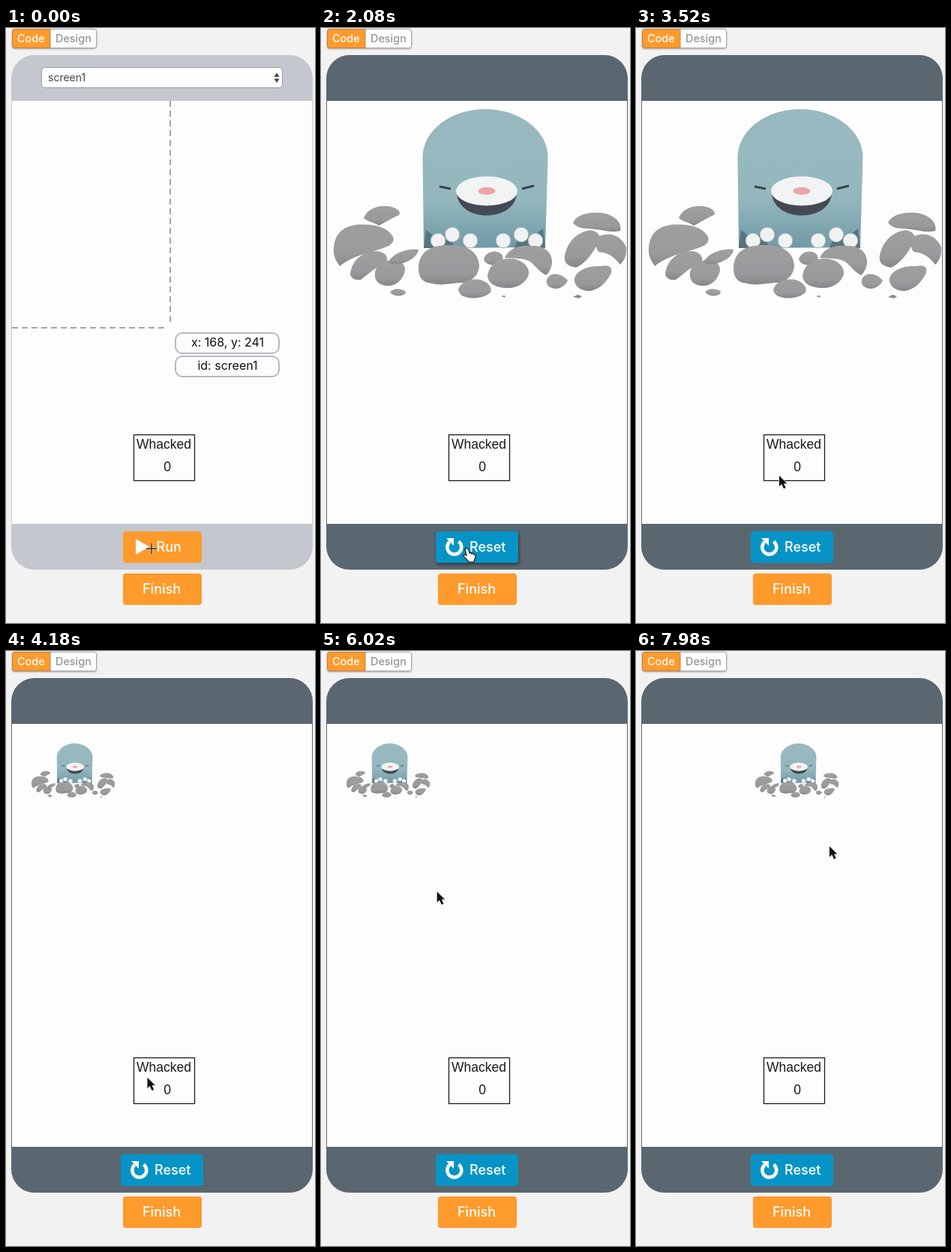
Animation of 412 by 792 pixels, one loop 8000 ms. Source, as an HTML page:

```html
<!DOCTYPE html>
<html lang="en">
<head>
<meta charset="utf-8">
<title>Whack a mole</title>
<style>
  html, body { margin: 0; width: 100%; height: 100%; overflow: hidden; background: #f2f2f2; }
  svg { display: block; width: 412px; height: 792px; }
  text { font-family: Inter, "Open Sans", sans-serif; }
  .button { font-size: 18px; font-weight: 500; fill: #fff; }
  .tab { font-size: 14.4px; font-weight: 500; }
  .label { font-size: 16px; fill: #111; text-anchor: middle; }
  .score { font: 17.5px "Liberation Sans", Arial, sans-serif; fill: #1a1a1c; }
  .shadow { filter: drop-shadow(1px 2px 2px #0008); }
  .tabs { filter: drop-shadow(0 1px 1px #0005); }
</style>
</head>
<body>
<svg viewBox="0 0 412 792">
  <defs>
    <linearGradient id="fur" x2="0" y2="1">
      <stop offset="0" stop-color="#98b9bf"/>
      <stop offset=".65" stop-color="#94b7be"/>
      <stop offset="1" stop-color="#7099a5"/>
    </linearGradient>
    <linearGradient id="stone" x2="0" y2="1">
      <stop offset="0" stop-color="#a09f9f"/>
      <stop offset=".7" stop-color="#9a999b"/>
      <stop offset="1" stop-color="#87868a"/>
    </linearGradient>
  </defs>

  <!-- tabs -->
  <g class="tabs">
    <rect x="8.500" y="1.500" width="112" height="25" rx="3" fill="#fefefe" stroke="#a9a9ab"/>
    <path d="M59 1.500H11.500a3 3 0 0 0-3 3v19a3 3 0 0 0 3 3H59z" fill="#ff9a2c" stroke="#b98048"/>
  </g>
  <text class="tab" x="15" y="19" fill="#fff">Code</text>
  <text class="tab" x="66" y="19" fill="#949598">Design</text>

  <!-- phone -->
  <rect id="phone" x="7" y="36" width="402" height="685" rx="31"/>
  <rect x="8" y="97" width="400" height="563" fill="#fdfdfd"/>
  <g id="select">
    <rect x="47.500" y="52.500" width="321" height="27" rx="4" fill="#fefefe" stroke="#9b9ca2"/>
    <text x="56" y="71" font-size="14" fill="#45464c">screen1</text>
    <path d="M357.500 65l3.500-5.500 3.500 5.500zM357.500 67.500l3.500 5.500 3.500-5.500z" fill="#404247"/>
  </g>

  <g id="mole">
    <path d="M137 293L135.500 172A83.500 64 0 0 1 302.500 172L299 292Z" fill="url(#fur)"/>
    <path d="M181 218c0 42 80 42 80 0z" fill="#454953"/>
    <ellipse cx="221" cy="217" rx="41" ry="19.500" fill="#f1f3f4"/>
    <ellipse cx="221" cy="217" rx="11.500" ry="5" fill="#eba4a8"/>
    <path d="M158 211l15 3M268 214l16-4" stroke="#3d434a" stroke-width="3"/>
    <path d="M137 293l3-24 14 10 16-6 8 20zM299 293l-3-26-14 11-16-6-8 21z" fill="#547480"/>
    <g id="toes" fill="#f0f2f3" stroke="#aab7bb"></g>
    <g fill="url(#stone)">
      <path d="M57 253C61 242 73 236 88 237C99 238 108 244 104 249C94 253 82 261 77 263C70 258 64 259 57 253Z"/>
      <path d="M17 293C18 276 27 265 46 262C66 260 87 264 94 275C101 283 93 290 85 292C68 299 43 302 25 317C20 309 16 304 17 293Z"/>
      <path d="M39 328C41 309 55 297 75 297C86 298 91 306 87 312C73 318 64 327 53 335C46 336 41 334 39 328Z"/>
      <path d="M72 326C73 315 85 308 99 309C111 311 115 320 110 329C105 340 94 346 82 342C75 340 71 334 72 326Z"/>
      <path d="M90 311C97 299 116 293 130 295C129 304 117 312 104 314C97 315 92 314 90 311Z"/>
      <path d="M92 352C96 346 106 346 113 351C113 357 99 359 92 352Z"/>
      <path d="M130 319C131 298 145 289 170 289C194 288 209 297 211 315C211 327 204 336 190 339C177 338 164 344 148 340C135 339 130 332 130 319Z"/>
      <path d="M183 348C187 337 199 333 212 335C222 338 229 344 226 352C217 360 202 361 193 358C187 357 184 353 183 348Z"/>
      <path d="M217 308C219 299 230 295 238 299C245 303 244 311 236 315C227 317 219 314 217 308Z"/>
      <path d="M245 306C250 293 264 289 281 290C299 289 309 300 308 313C307 321 303 327 300 329C292 325 287 318 279 311C268 305 255 307 245 306Z"/>
      <path d="M222 330C224 315 236 307 253 307C268 308 278 317 277 328C273 340 261 347 246 346C232 345 223 340 222 330Z"/>
      <path d="M301 335C305 325 319 325 329 336C325 345 315 349 308 346C302 344 300 340 301 335Z"/>
      <path d="M336 259C341 249 354 245 373 246C391 248 402 259 399 270C386 273 378 269 366 268C355 266 343 269 336 259Z"/>
      <path d="M325 303C329 284 341 272 359 269C372 271 374 279 369 287C362 300 354 312 340 319C329 317 323 312 325 303Z"/>
      <path d="M371 277C386 270 402 278 407 292C408 303 404 310 399 315C393 308 386 299 370 298C365 292 366 281 371 277Z"/>
      <path d="M338 333C342 321 358 316 374 317C385 314 390 320 386 328C379 340 372 347 359 350C345 350 337 343 338 333Z"/>
    </g>
    <path d="M336 358l6-3 6 2-4 3zM240 357l5-1 1 3z" fill="#8a898c"/>
  </g>

  <!-- score -->
  <rect x="170.500" y="541.500" width="81" height="61" fill="#fdfdfd" stroke="#1c1c1e" stroke-width="1.300"/>
  <text class="score" x="174" y="560">Whacked</text>
  <text class="score" x="215" y="590" text-anchor="middle">0</text>

  <!-- coordinate guides -->
  <g id="guides">
    <path d="M219 97V391M8 399H212" fill="none" stroke="#a2a4b0" stroke-width="2" stroke-dasharray="8 5"/>
    <g fill="#fdfdfd" stroke="#b6b8c3" stroke-width="2">
      <rect x="226" y="406" width="138" height="27" rx="9"/>
      <rect x="226" y="437" width="138" height="27" rx="9"/>
    </g>
    <text class="label" x="295.500" y="424">x: 168, y: 241</text>
    <text class="label" x="295.500" y="455">id: screen1</text>
  </g>

  <!-- buttons -->
  <g id="run">
    <rect x="156" y="670" width="105" height="42" rx="4" fill="#ff9a2c"/>
    <path d="M173 680v21l18-10.500z" fill="#fff"/>
    <text class="button" x="200.500" y="697">Run</text>
  </g>
  <g id="reset">
    <rect x="153" y="670" width="110" height="42" rx="4" fill="#0694c6"/>
    <path d="M183.500 683.500A9.500 9.500 0 1 1 171.500 684" fill="none" stroke="#fff" stroke-width="4.500"/>
    <path d="M167 679h10v10z" fill="#fff"/>
    <text class="button" x="198" y="697">Reset</text>
  </g>
  <rect x="156" y="726" width="105" height="42" rx="4" fill="#ff9a2c"/>
  <text class="button" x="182" y="753">Finish</text>

  <!-- pointers, each with its hot spot at 0,0 -->
  <g id="pointer">
    <circle id="ring" cx="1" cy="2" r="21.300" fill="none" stroke="#111" stroke-width="3"/>
    <g id="cross" fill="none">
      <path d="M-7 0H7M0-7V7" stroke="#fff8" stroke-width="3"/>
      <path d="M-7 0H7M0-7V7" stroke="#333" stroke-width="1.500"/>
    </g>
    <path id="hand" d="M-2 0C-1-2 2-2 3 1L4 5C5 4 7 4 7 6 8 5 10 5 10 7 12 6 12 8 12 9 12 12 10 14 10 17H3C2 14-2 12-4 9-4 7-2 7 0 8Z" fill="#fff" stroke="#222" stroke-width="1.300"/>
    <path id="arrow" d="M0 0V14L3.300 11 6 17 8.500 16 6 10.200H10.200Z" fill="#111" stroke="#e6e6e8" stroke-width="1.500" paint-order="stroke"/>
  </g>
</svg>
<script>
  const LOOP = 8000;
  const GUIDES_OFF = 1100, RUN = 1940, SHRINK = 3860, HOP = 7060;
  const CLICK = [6760, 6980];
  // time, x, y
  const pointerPath = [
    [0, 194, 693], [2500, 194, 694], [3400, 191, 596], [3900, 191, 596],
    [5150, 172, 378], [5700, 172, 378], [6650, 107, 161], [7450, 107, 161], [7940, 258, 260]
  ];
  const el = id => document.getElementById(id);
  const show = (id, on) => el(id).style.display = on ? '' : 'none';

  el('toes').innerHTML = [[156, 283], [175, 275], [199, 283], [243, 283], [267, 275], [286, 283]]
    .map(([x, y]) => `<circle cx="${x}" cy="${y}" r="9.8"/>`).join('');

  function pointerAt(t) {
    const next = pointerPath.findIndex(point => point[0] > t);
    if (next < 0) return pointerPath.at(-1).slice(1);
    const [t0, x0, y0] = pointerPath[next - 1];
    const [t1, x1, y1] = pointerPath[next];
    const u = (t - t0) / (t1 - t0), eased = u * u * (3 - 2 * u);
    return [x0 + (x1 - x0) * eased, y0 + (y1 - y0) * eased];
  }

  function draw(t) {
    const running = t >= RUN;
    const [x, y] = pointerAt(t);
    const guides = t < GUIDES_OFF, hover = !guides && y > 670;

    el('phone').setAttribute('fill', running ? '#5a6770' : '#c4c7cd');
    show('select', !running);
    show('guides', guides);
    show('run', !running);
    show('reset', running);
    for (const id of ['run', 'reset']) el(id).classList.toggle('shadow', hover);

    show('mole', running);
    const left = t < HOP ? 29.1 : 154.1;
    el('mole').setAttribute('transform', t < SHRINK ? '' : `translate(${left} 92.2) scale(.2855)`);

    el('pointer').setAttribute('transform', `translate(${x} ${y})`);
    show('cross', guides);
    show('hand', hover);
    show('arrow', !guides && !hover);
    show('ring', t >= CLICK[0] && t < CLICK[1]);
  }

  const start = performance.now();
  function tick() {
    draw((performance.now() - start) % LOOP);
    requestAnimationFrame(tick);
  }
  tick();
</script>
</body>
</html>
```
